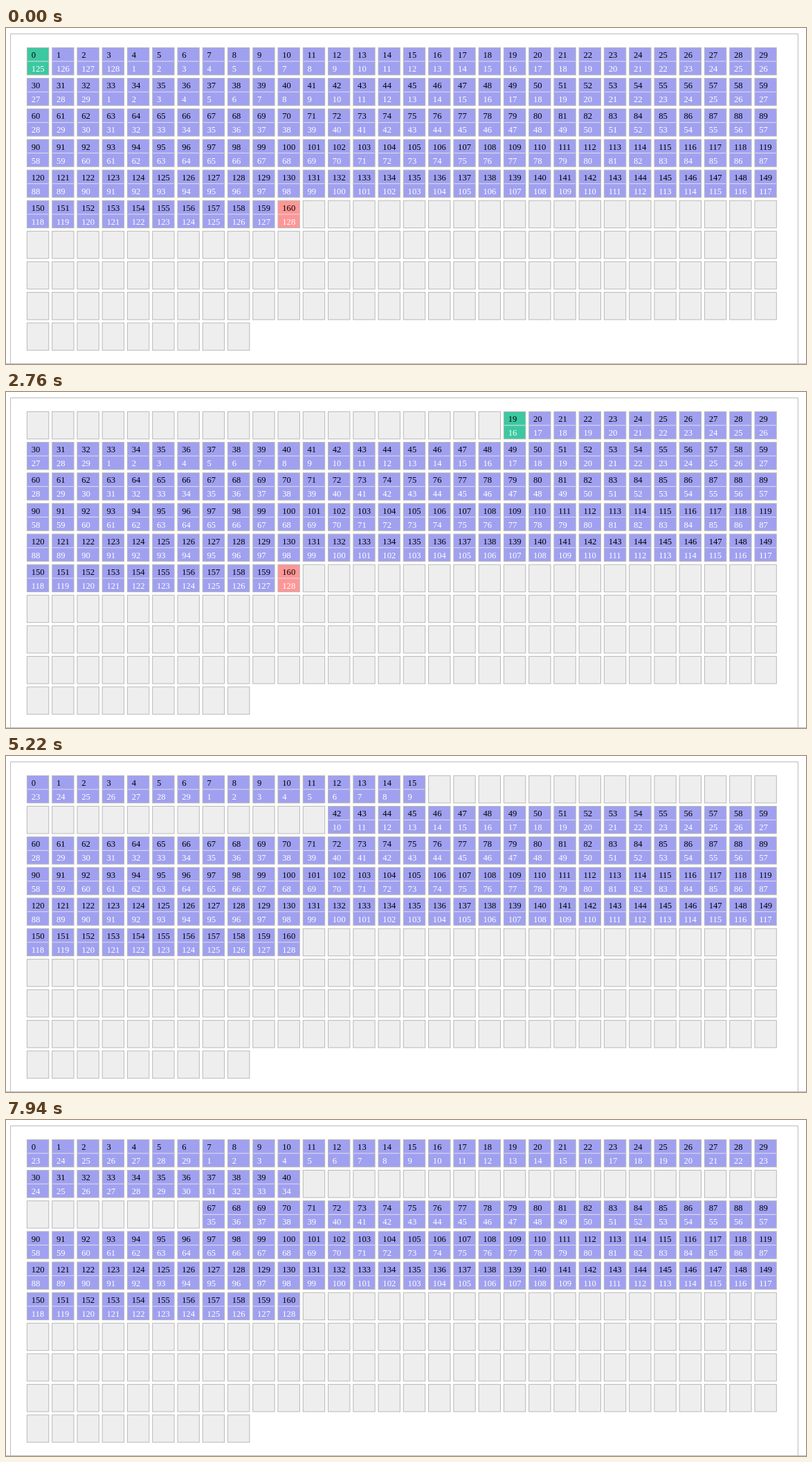
These frames come from a looping animation (1156 px wide and 485 px high, 8000 ms). An HTML page:

```html
<!DOCTYPE html>
<html lang="en">
<head>
<meta charset="utf-8">
<title>Ring of cells</title>
<style>
  html, body { margin: 0; width: 100%; height: 100%; overflow: hidden; background: #fff; }
  svg { display: block; width: 1156px; height: 485px; }
  text { font: 12.6px "Liberation Serif", serif; }
  .frame { fill: none; stroke: #bbb; }
  .edge { fill: #b9b9b9; }
  .fill { fill: #eee; }
  .divider { fill: #dedeea; }
  .index { fill: #000; }
  .value { fill: #fff; }
  .used .fill { fill: #a0a0f0; }
  .head .fill { fill: #3cc8a0; }
  .tail .fill { fill: #ff9696; }
  .empty .divider, .empty text { display: none; }
</style>
</head>
<body>
<svg viewBox="0 0 1156 485">
  <path class="frame" d="M6.5 485V8.5H1144.5V485M0 484.5H1156"/>
</svg>
<script>
const LOOP = 8000;
const COLUMNS = 30, CELLS = 279, LAST = 160, DROPPED = 26;
const PITCH_X = 36.26, PITCH_Y = 44.15, WIDTH = 32.4, HEIGHT = 40.4;

// Pauses before each step, in hundredths of a second.
const GAPS = `50 14 14 13 13 6 13 14 14 13 13 13 7 13 13
  14 13 13 13 7 6 7 14 13 13 7 13
  14 6 13 14 6 13 14 13 7 13 7 13 7 13
  13 13 7 13 7 13 13 6 14 13 7 13 13 7 13 7
  13 14 7 13 6 13 14 6 13 14`.split(/\s+/).map(Number);

let clock = 0;
const stepTimes = GAPS.map(gap => clock += gap * 10);

const svg = document.querySelector("svg");

function add(parent, tag, attributes) {
  const node = document.createElementNS("http://www.w3.org/2000/svg", tag);
  for (const name in attributes) node.setAttribute(name, attributes[name]);
  return parent.appendChild(node);
}

function makeCell(i) {
  const x = 29.9 + (i % COLUMNS) * PITCH_X;
  const y = 27.9 + Math.floor(i / COLUMNS) * PITCH_Y;
  const group = add(svg, "g", {});
  const box = (name, left, top, width, height) =>
    add(group, "rect", { class: name, x: x + left, y: y + top, width, height });
  box("edge", 0, 0, WIDTH, HEIGHT);
  box("fill", 1, 1, WIDTH - 2, HEIGHT - 2);
  box("divider", 1, 19.7, WIDTH - 2, 1);
  add(group, "text", { class: "index", x: x + 6.8, y: y + 15.2 }).textContent = i;
  const value = add(group, "text", { class: "value", x: x + 6.8, y: y + 35.2 });
  return { group, value };
}

const cells = Array.from({ length: CELLS }, (_, i) => makeCell(i));

function initialValue(i) {
  if (i < 4) return 125 + i;
  return i < 33 ? i - 3 : i - 32;
}

// First the head drops cells, then the rest moves to the front one by one.
function drawStep(step) {
  const dropping = step <= DROPPED;
  const moved = Math.max(0, step - DROPPED);
  cells.forEach(({ group, value }, i) => {
    const shifted = i < moved;
    const used = shifted || (i >= step && i <= LAST);
    let state = used ? "used" : "empty";
    if (dropping && i === step) state = "head";
    if (dropping && i === LAST) state = "tail";
    group.setAttribute("class", state);
    value.textContent = used ? initialValue(shifted ? i + DROPPED : i) : "";
  });
}

let shown = -1;
const start = performance.now();

function tick() {
  const time = (performance.now() - start) % LOOP;
  const step = stepTimes.filter(t => t <= time).length;
  if (step !== shown) drawStep(shown = step);
  requestAnimationFrame(tick);
}
tick();
</script>
</body>
</html>
```
